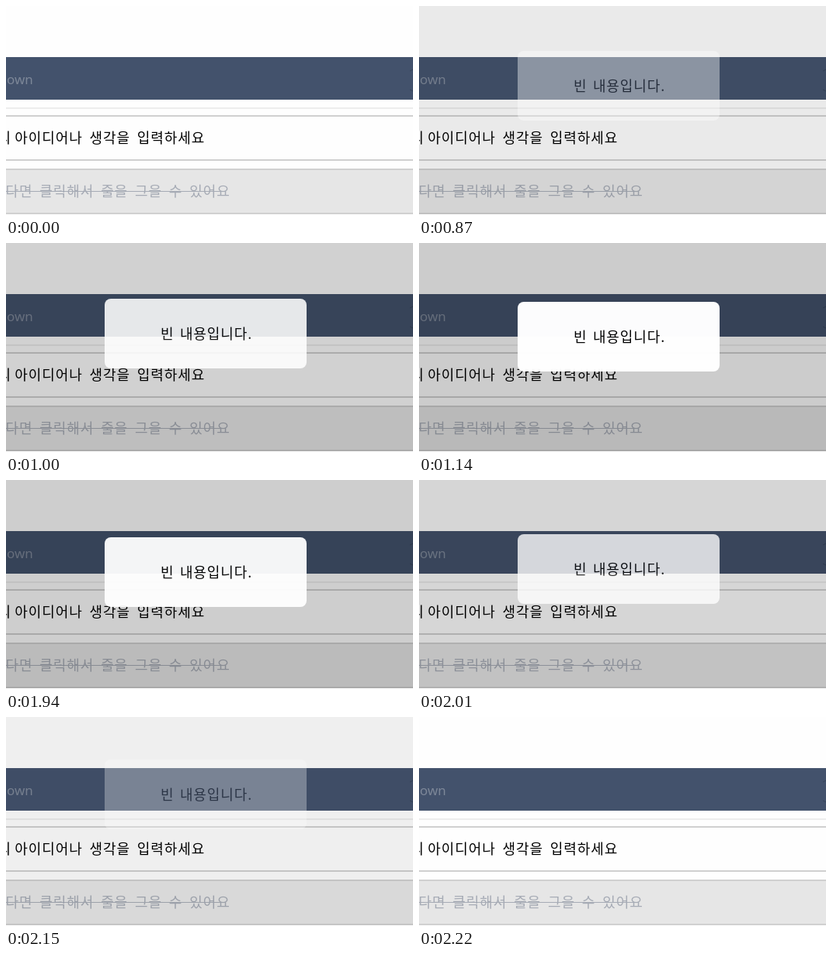
Animation, 524 px wide and 270 px high, one loop 2700 ms. Source, as an HTML page:

```html
<!DOCTYPE html>
<html lang="ko">
<head>
<meta charset="utf-8">
<title>Empty content alert</title>
<style>
  html, body { margin: 0; width: 100%; height: 100%; overflow: hidden; background: #fefefe; }
  svg { display: block; }
  text {
    font: 18px "Noto Sans CJK KR", "Noto Sans CJK", "Noto Sans", sans-serif;
    letter-spacing: .9px;
    word-spacing: 3px;
    white-space: pre;
  }
  .own { font: 17px "Noto Sans", sans-serif; letter-spacing: 0; fill: #7d8798; }
  .field { stroke: #d0d0d0; stroke-width: 2; }
  .done { fill: #a6abb5; }
  #modal text { word-spacing: 1.5px; }
</style>
</head>
<body>
<svg width="524" height="270" viewBox="0 0 524 270">
  <rect width="524" height="270" fill="#fefefe"/>
  <rect y="66" width="524" height="55" fill="#43526c"/>
  <text class="own" x="1" y="101">own</text>
  <path d="M520 84l4-2M520 108l4 2" stroke="#36435a" fill="none"/>
  <rect y="131" width="524" height="2" fill="#ededed"/>

  <rect class="field" x="-20" y="142" width="564" height="57" fill="#fefefe"/>
  <text x="-10.5" y="177">의</text>
  <text x="11.3" y="177">아이디어나 생각을 입력하세요</text>

  <rect class="field" x="-20" y="211" width="564" height="57" fill="#e6e6e6"/>
  <text class="done" x="-.5" y="246">다면 클릭해서 줄을 그을 수 있어요</text>
  <rect class="done" y="239" width="283" height="1"/>

  <rect id="shade" width="524" height="269"/>
  <g id="modal">
    <rect x="127" width="260" height="90" rx="8" fill="#fff"/>
    <text x="199" y="52">빈 내용입니다.</text>
  </g>
</svg>
<script>
  const LOOP = 2700;
  const shade = document.getElementById('shade');
  const modal = document.getElementById('modal');

  // [start time in ms, visibility]: the dialog eases in, holds, then drops away
  const steps = [
    [0, 0],
    [870, .4], [940, .73], [1000, .88], [1070, .96], [1140, .99],
    [1940, .95], [2010, .79], [2080, .577], [2150, .3], [2220, 0]
  ];

  function draw(time) {
    const now = time % LOOP;
    const shown = steps.findLast(([start]) => start <= now)[1];
    const top = Math.round(76 - 30.5 * (1 - shown));
    shade.setAttribute('opacity', .2 * shown);
    modal.setAttribute('opacity', shown);
    modal.setAttribute('transform', `translate(0 ${top})`);
  }

  const begin = performance.now();
  function tick() {
    draw(performance.now() - begin);
    requestAnimationFrame(tick);
  }
  tick();
</script>
</body>
</html>
```
